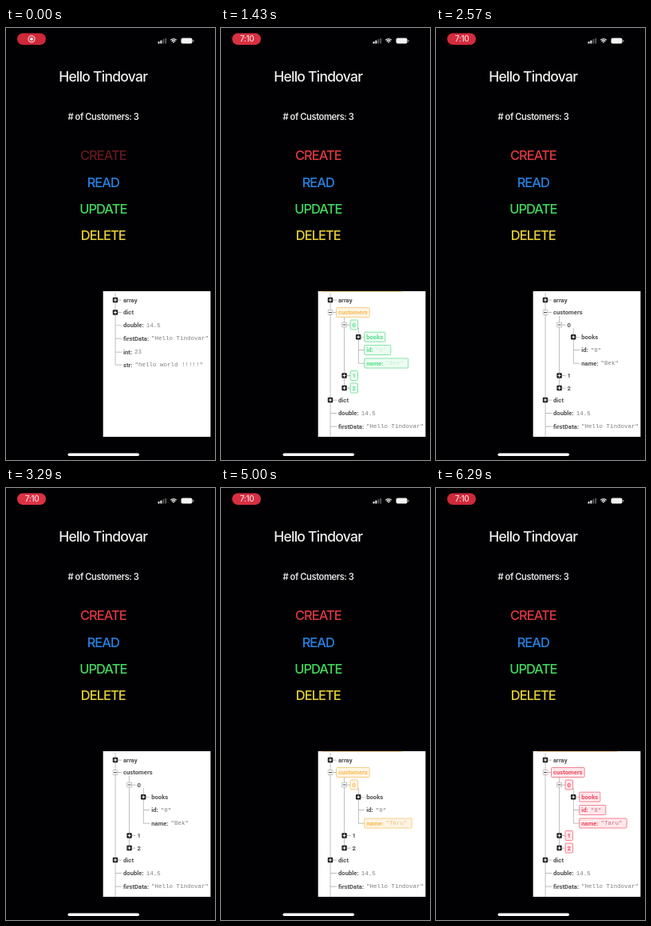
These frames come from a looping animation (262x540 px, 6.44 s). An HTML page with a canvas:

```html
<!DOCTYPE html>
<html lang="en">
<head>
<meta charset="utf-8">
<title>Realtime database demo</title>
<style>
  html, body { margin: 0; width: 100%; height: 100%; overflow: hidden; background: #010103; }
  canvas { display: block; width: 262px; height: 540px; }
</style>
</head>
<body>
<canvas></canvas>
<script>
const LOOP = 6440, STEP = 1000 / 7, LAST_STEP = 44;
const canvas = document.querySelector('canvas');
const ctx = canvas.getContext('2d');
const ratio = window.devicePixelRatio || 1;
canvas.width = 262 * ratio;
canvas.height = 540 * ratio;
ctx.scale(ratio, ratio);

const UI = 'Inter, sans-serif';
const KEY_FONT = 'bold 7.7px Roboto, sans-serif';
const VALUE_FONT = '7.5px "Liberation Mono", monospace';
const GREEN = { line: '#74e29c', text: '#55df8c', value: '#bff0d1', fill: '#effcf3' };
const ORANGE = { line: '#f7c981', text: '#f8b955', value: '#f0bd78', fill: '#fff5e4' };
const RED = { line: '#f5778a', text: '#ee4a62', value: '#c9707d', fill: '#ffe8eb' };

// Buttons dim between the steps down and up, then recover.
const buttons = [
  { label: 'CREATE', y: 165, color: '#dc3741', down: 0, up: 0 },
  { label: 'READ', y: 198.5, color: '#2682e4', down: 14, up: 14 },
  { label: 'UPDATE', y: 232, color: '#43d65e', down: 20, up: 21 },
  { label: 'DELETE', y: 265, color: '#e6cf36', down: 40, up: 42 }
];

const row = (depth, y, key, value, icon) => ({ depth, y, key, value, icon });
const greeting = '"Hello Tindovar"';
const shortTree = [
  row(0, 340, 'array', '', '+'),
  row(0, 355.5, 'dict', '', '+'),
  row(0, 371.7, 'double:', '14.5'),
  row(0, 388, 'firstData:', greeting),
  row(0, 405, 'int:', '23'),
  row(0, 421, 'str:', '"hello world !!!!!"')
];
const fullTree = name => [
  row(0, 340, 'array', '', '+'),
  row(0, 355.5, 'customers', '', '-'),
  row(1, 371, '0', '', '-'),
  row(2, 386.2, 'books', '', '+'),
  row(2, 402.5, 'id:', '"0"'),
  row(2, 419, 'name:', `"${name}"`),
  row(1, 434.5, '1', '', '+'),
  row(1, 450, '2', '', '+'),
  row(0, 465, 'dict', '', '+'),
  row(0, 481.5, 'double:', '14.5'),
  row(0, 498, 'firstData:', greeting)
];

const clamp = v => Math.max(0, Math.min(1, v));
const fade = (t, from, to) => clamp((to - t) / (to - from));

function rect(x, y, w, h, color, radius = 0) {
  ctx.fillStyle = color;
  ctx.beginPath();
  ctx.roundRect(x, y, w, h, radius);
  ctx.fill();
}

function text(str, x, y, font, color, align = 'left', spacing = 0) {
  ctx.font = font;
  ctx.letterSpacing = spacing + 'px';
  ctx.textAlign = align;
  ctx.fillStyle = color;
  ctx.fillText(str, x, y);
}

function widthOf(str, font) {
  ctx.font = font;
  ctx.letterSpacing = '0px';
  return ctx.measureText(str).width;
}

function arc(x, y, r, from, to, color, width) {
  ctx.strokeStyle = color;
  ctx.lineWidth = width;
  ctx.beginPath();
  ctx.arc(x, y, r, from, to);
  ctx.stroke();
}

function drawStatusBar(t, step) {
  const pulse = 0.5 - 0.5 * Math.cos(2 * Math.PI * t / (LOOP / 3));
  rect(14, 6.5, 36, 14.5, `rgb(${206 + 14 * pulse}, ${40 + 10 * pulse}, ${57 + 12 * pulse})`, 7.2);
  if (step < 9) {
    arc(32, 13.7, 4, 0, 7, '#f8e4e6', 1.1);
    rect(30, 11.7, 4, 4, '#f8e4e6', 2);
  } else {
    text('7:10', 32.6, 17.2, '500 10px ' + UI, '#f3d9dc', 'center', -0.3);
  }
  for (let i = 0; i < 4; i++) {
    const h = 2.6 + i * 1.4;
    rect(190.5 + i * 2.9, 19.5 - h, 2, h, i < 2 ? '#eee' : '#555', 0.5);
  }
  for (const r of [1.6, 3.6, 5.6]) arc(210, 19.3, r, -2.3, -0.84, '#eee', 1.3);
  rect(219.5, 12.5, 14, 7, '#f4f4f4', 2);
  rect(234.3, 14.8, 1.1, 2.6, '#999', 0.5);
}

function drawButton({ label, y, color, down, up }, step) {
  const active = step >= down && step <= up + 1;
  ctx.globalAlpha = !active ? 1 : step <= up ? 0.45 : 0.65;
  text(label, 121.8, y, '500 16.5px ' + UI, color, 'center', -1);
  ctx.globalAlpha = 1;
}

function drawIcon(x, y, kind) {
  const open = kind === '-';
  rect(x - 3.2, y - 3.2, 6.4, 6.4, open ? '#aaa' : '#222', 1);
  if (open) rect(x - 2.6, y - 2.6, 5.2, 5.2, '#fff', 0.5);
  const mark = open ? '#444' : '#fff';
  rect(x - 1.9, y - 0.5, 3.8, 1, mark);
  if (!open) rect(x - 0.5, y - 1.9, 1, 3.8, mark);
}

function drawLabel({ depth, y, key, value }, style) {
  const x = 147 + depth * 17.6;
  const keyWidth = widthOf(key, KEY_FONT);
  if (style.line) {
    const w = keyWidth + (value ? 6 + widthOf(value, VALUE_FONT) : 0) + 5;
    rect(x - 2.5, y - 6, w, 12, style.fill, 1);
    ctx.strokeStyle = style.line;
    ctx.lineWidth = 0.9;
    ctx.stroke();
  }
  text(key, x, y + 2.5, KEY_FONT, style.text);
  text(value, x + keyWidth + 3, y + 2.4, VALUE_FONT, style.value);
}

function highlight(rows, pick, alpha) {
  ctx.globalAlpha = alpha;
  rect(127, 329, 100, 1.1, '#f9d49c');
  rows.forEach((r, i) => {
    const style = pick(r, i);
    if (style) drawLabel(r, style);
  });
  ctx.globalAlpha = 1;
}

function drawPanel(t, step) {
  const full = step >= 3;
  const rows = full ? fullTree(step < 24 ? 'Bek' : 'Taru') : shortTree;
  const plain = { text: '#505050', value: '#808080' };
  ctx.save();
  ctx.beginPath();
  ctx.rect(121.7, 329, 134.7, 182);
  ctx.clip();
  rect(121, 328, 137, 184, '#fff');

  const gray = '#a5a5a5';
  rect(136.7, 331, 0.7, full ? 180 : 90, gray);
  if (full) {
    rect(154.3, 360, 0.7, 90, gray);
    rect(171.9, 375, 0.7, 44, gray);
  }
  for (const r of rows) {
    const x = 137 + r.depth * 17.6;
    rect(x, r.y - 0.3, 8, 0.7, gray);
    if (r.icon) drawIcon(x, r.y, r.icon);
    drawLabel(r, plain);
  }

  const inCustomers = i => i >= 1 && i <= 7;
  if (step >= 42) {
    highlight(rows, (r, i) => inCustomers(i) && RED, 1);
  } else if (step >= 24) {
    highlight(rows, (r, i) => [1, 2, 5].includes(i) && ORANGE, fade(t, 5000, 5430));
  } else if (full) {
    highlight(rows, (r, i) => inCustomers(i) && (i === 1 ? ORANGE : GREEN), fade(t, 1500, 2200));
  }
  ctx.restore();
}

function draw(now) {
  const step = Math.min(LAST_STEP, Math.floor((now % LOOP + 5) / STEP));
  const t = step * STEP;
  rect(0, 0, 262, 540, '#010103');
  drawStatusBar(t, step);
  text('Hello Tindovar', 121.7, 66.7, '500 17.5px ' + UI, '#efefef', 'center', -0.75);
  text('# of Customers: 3', 122, 114.7, '600 11.2px ' + UI, '#e2e2e2', 'center', -0.45);
  for (const button of buttons) drawButton(button, step);
  drawPanel(t, step);
  rect(77.5, 531.5, 89.5, 3.5, '#fff', 1.75);
  requestAnimationFrame(() => draw(performance.now() - start));
}

const start = performance.now();
draw(0);
</script>
</body>
</html>
```
